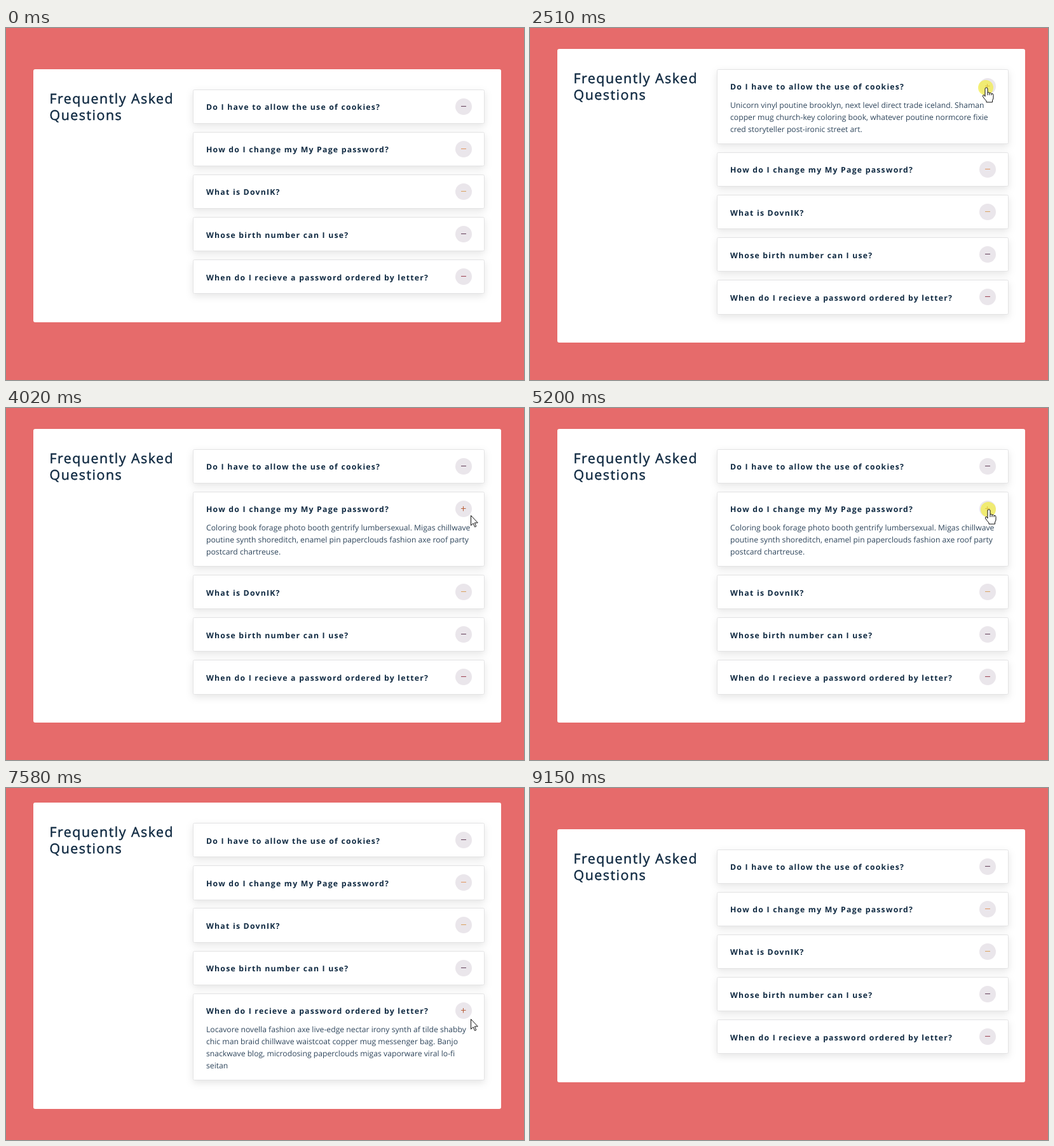
Write an HTML page that moves like this. It is 815 by 555 pixels and loops after 9.74 s.

```html
<!DOCTYPE html>
<html lang="en">
<head>
<meta charset="utf-8">
<title>FAQ</title>
<style>
  html, body { margin: 0; width: 100%; height: 100%; overflow: hidden; background: #e66b6b; }
  svg { display: block; font-family: "Open Sans", "Noto Sans", sans-serif; text-rendering: geometricPrecision; }
  .title { font-size: 21.4px; letter-spacing: 1.5px; fill: #102a42; stroke: #102a42; stroke-width: .45; }
  .question { font-size: 12.3px; font-weight: 700; letter-spacing: 1.2px; fill: #102a42; }
  .answer { font-size: 12.2px; fill: #2f465c; }
  .box { fill: #fff; stroke: #e3e3e4; filter: drop-shadow(0 4px 6px rgba(0, 0, 0, .1)); }
  .pointer { fill: #fff; stroke: #111; stroke-linejoin: round; }
</style>
</head>
<body>
<svg id="stage" width="815" height="555" viewBox="0 0 815 555"></svg>
<script>
const LOOP = 9740, STEP = 70;
const MIDDLE = 264.4, CARD_H = 399;
const ITEM_H = 54.2, PITCH = 67.1, LINE_H = 19.25;
const ICON_X = 720, ICON_R = 13;

const faq = [
  { q: 'Do I have to allow the use of cookies?', tint: '#6b4a62', a: [
    'Unicorn vinyl poutine brooklyn, next level direct trade iceland. Shaman',
    'copper mug church-key coloring book, whatever poutine normcore fixie',
    'cred storyteller post-ironic street art.'] },
  { q: 'How do I change my My Page password?', tint: '#e09a66', a: [
    'Coloring book forage photo booth gentrify lumbersexual. Migas chillwave',
    'poutine synth shoreditch, enamel pin paperclouds fashion axe roof party',
    'postcard chartreuse.'] },
  { q: 'What is DovnIK?', tint: '#d9a566', a: [] },
  { q: 'Whose birth number can I use?', tint: '#6b4a62', a: [] },
  { q: 'When do I recieve a password ordered by letter?', tint: '#a04a5a', a: [
    'Locavore novella fashion axe live-edge nectar irony synth af tilde shabby',
    'chic man braid chillwave waistcoat copper mug messenger bag. Banjo',
    'snackwave blog, microdosing paperclouds migas vaporware viral lo-fi',
    'seitan'] }
];

// Each item is opened by one click and closed by the next
const visits = [
  { item: 0, open: [1300, 1410], close: [2510, 2580] },
  { item: 1, open: [3750, 3820], close: [5200, 5330] },
  { item: 4, open: [6700, 6850], close: [8460, 8530] }
];

// Pointer stops: leave, arrive, x, y
const stops = [
  [0, 0, 786, 139],
  [530, 1080, 721, 124],
  [1760, 2110, 718, 94],
  [2650, 3340, 720, 199],
  [3480, 3620, 719, 182],
  [4020, 4230, 742, 96],
  [4430, 5130, 722, 160],
  [5400, 6090, 734, 339],
  [6290, 6630, 720, 398],
  [7180, 7580, 731, 364],
  [7650, 7860, 716, 351],
  [8600, 9080, 790, 546]
];

const stage = document.getElementById('stage');
const during = (t, [from, to]) => t >= from && t < to;

function set(el, attrs) {
  for (const key in attrs) el.setAttribute(key, attrs[key]);
  return el;
}

function add(parent, tag, attrs, text) {
  const el = set(document.createElementNS('http://www.w3.org/2000/svg', tag), attrs);
  if (text) el.textContent = text;
  return parent.appendChild(el);
}

function show(el, on) {
  el.style.display = on ? '' : 'none';
}

function place(el, x, y) {
  el.setAttribute('transform', `translate(${x} ${y})`);
}

// Snap both edges to whole pixels; inset makes room for a stroke
function span(rect, top, height, inset = 0) {
  const y = Math.round(top);
  set(rect, { y: y + inset, height: Math.round(top + height) - y - 2 * inset });
}

add(stage, 'rect', { width: 815, height: 555, fill: '#e66b6b' });
const card = add(stage, 'rect', { x: 43, width: 736, rx: 3, fill: '#fff' });
const title = add(stage, 'g', { class: 'title' });
add(title, 'text', { x: 68.5, y: 53.7 }, 'Frequently Asked');
add(title, 'text', { x: 68.5, y: 80.2 }, 'Questions');

const rows = faq.map(({ q, a }) => {
  const box = add(stage, 'rect', { class: 'box', x: 294.5, width: 458, rx: 2 });
  const question = add(stage, 'text', { class: 'question', x: 315 }, q);
  const icon = add(stage, 'g', {});
  add(icon, 'circle', { r: ICON_R, fill: '#eae6eb' });
  const glyph = add(icon, 'path', { transform: 'translate(-.5 -.5)', 'stroke-width': 1.1 });
  const answer = add(stage, 'g', { class: 'answer' });
  a.forEach((line, i) => add(answer, 'text', { x: 315, y: i * LINE_H }, line));
  return { box, question, icon, glyph, answer };
});

const halo = add(stage, 'circle', { r: 12, fill: '#f2ed40', opacity: .7 });
const arrow = add(stage, 'path', { class: 'pointer',
  d: 'M.5 .5V16.2L4.1 12.8L6.6 18.6L8.8 17.6L6.3 12H11.3Z' });
const hand = add(stage, 'path', { class: 'pointer',
  d: 'M-2 14V2Q-2 0 0 0T2 2V8Q4 6.5 5 8.5Q7 7.5 8 9.5Q11 9 11 11.5V16Q11 18 9.5 20V23H0V21' +
     'Q-3 18-5.5 14Q-6 11.5-4 11.5Q-3 11.5-2 14ZM2 8V12M5 8.5V12M8 9.5V12' });

function layout(open) {
  const extra = open < 0 ? 0 : 6.3 + faq[open].a.length * LINE_H;
  const top = MIDDLE - (CARD_H + extra) / 2;
  span(card, top, CARD_H + extra);
  place(title, 0, Math.round(top));

  return rows.map(({ box, question, icon, glyph, answer }, i) => {
    const isOpen = i === open;
    const y = top + 32 + i * PITCH + (open >= 0 && i > open ? extra : 0);
    const iconY = Math.round(y + 27);
    span(box, y, ITEM_H + (isOpen ? extra : 0), .5);
    set(question, { y: Math.round(y + 32.4) });
    place(icon, ICON_X, iconY);
    set(glyph, {
      d: isOpen ? 'M-3.5 0H4M0-3.5V4' : 'M-3.5 0H4.5',
      stroke: isOpen ? '#b9603c' : faq[i].tint
    });
    place(answer, 0, y + 60.9);
    show(answer, isOpen);
    return iconY;
  });
}

// Eased travel between stops, bowed to the right and advanced in steps
function pointerAt(t) {
  if (t < 530) return [797, 529];
  const i = stops.findLastIndex(s => t >= s[0]);
  const [from, to, x1, y1] = stops[i];
  const [, , x0, y0] = stops[i - 1];
  const count = Math.floor((to - from) / STEP) + 1;
  const p = Math.min(1, (Math.floor((t - from) / STEP) + 1) / count);
  const e = p * p * (3 - 2 * p);
  const bow = .2 * Math.hypot(x1 - x0, y1 - y0) * Math.sin(Math.PI * e);
  return [x0 + (x1 - x0) * e + bow, y0 + (y1 - y0) * e].map(Math.round);
}

function draw(t) {
  const visit = visits.find(v => during(t, [v.open[1], v.close[1]]));
  const icons = layout(visit ? visit.item : -1);
  const [x, y] = pointerAt(t);
  const visible = during(t, [200, 270]) || during(t, [530, 9150]);
  const over = icons.some(iy => Math.hypot(x - ICON_X, y - iy) <= ICON_R);
  place(arrow, x, y);
  place(hand, x, y);
  place(halo, x - 1, y);
  show(arrow, visible && !over);
  show(hand, visible && over);
  show(halo, visits.some(v => during(t, v.open) || during(t, v.close)));
}

const start = performance.now();
function tick() {
  draw((performance.now() - start) % LOOP);
  requestAnimationFrame(tick);
}
tick();
</script>
</body>
</html>
```
